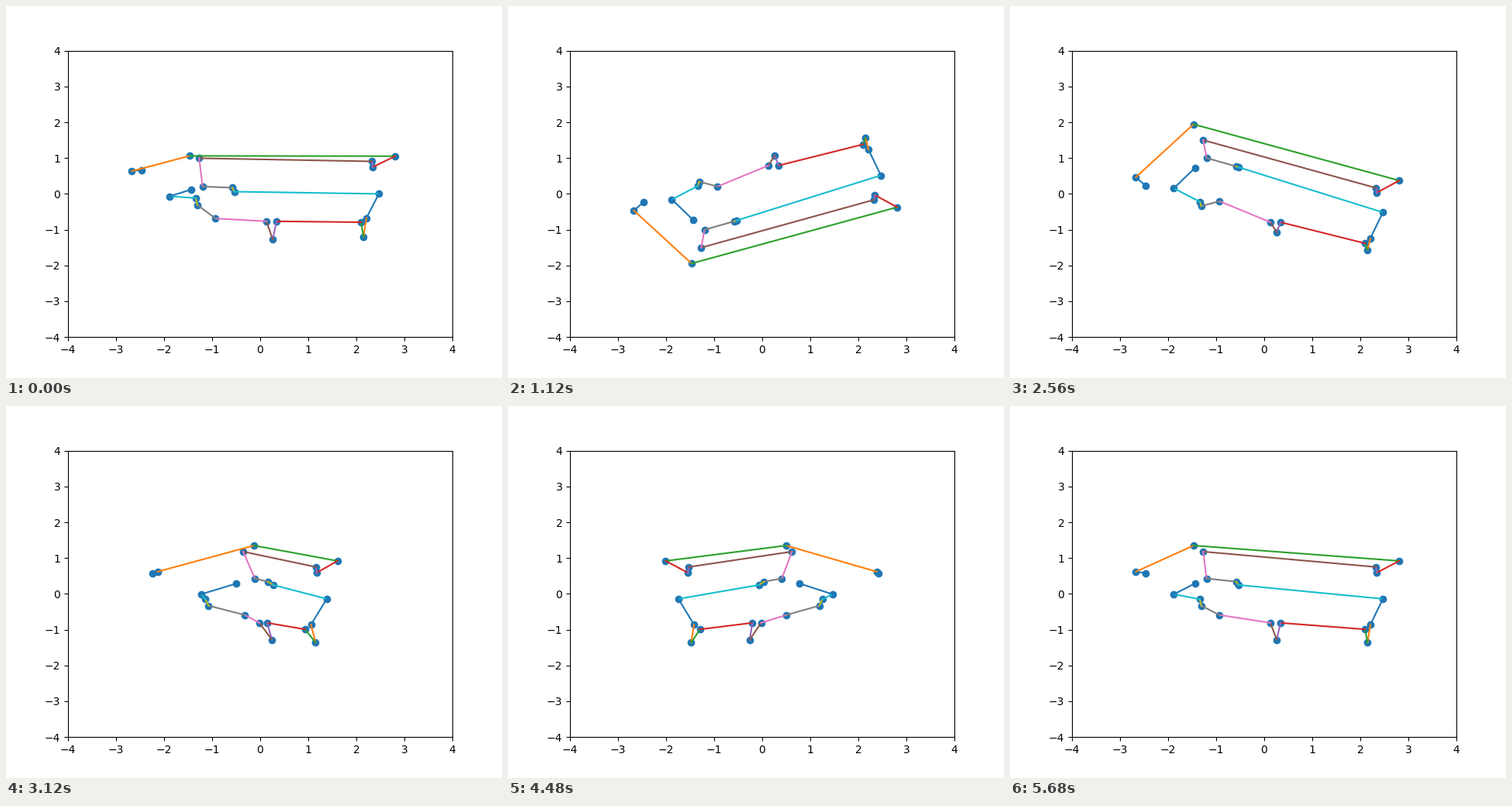
These frames come from a looping animation (640 by 480 pixels, 5840 ms). A matplotlib script:

```python
import numpy as np
import matplotlib.pyplot as plt
from matplotlib.animation import FuncAnimation

TURN = 36  # steps of 10 degrees in one full turn

# Corners of the bent wire, in drawing order
WIRE = np.array([
    (-2.47, .58, -.55), (-2.67, .62, -.14), (-1.47, 1.35, 1.55),
    (2.81, .92, -.85), (2.34, .59, -.96), (2.33, .75, -.97),
    (-1.27, 1.18, .96), (-1.2, .43, 1.26), (-.58, .34, .94),
    (-.54, .25, 1.06), (2.47, -.14, -.79), (2.21, -.86, -.99),
    (2.15, -1.36, -.77), (2.1, -.99, -1.05), (.34, -.81, -.18),
    (.26, -1.28, .07), (.13, -.81, -.18), (-.93, -.59, .61),
    (-1.31, -.33, -.11), (-1.34, -.15, -.18), (-1.88, -.01, .33),
    (-1.44, .29, .95),
])


def project(step):
    """Turn once about the x axis, then once about the y axis."""
    x, y, z = WIRE.T
    angle = 2 * np.pi * (step % TURN + 1) / TURN
    c, s = np.cos(angle), np.sin(angle)
    if step < TURN:
        return np.column_stack((x, y * c - z * s))
    return np.column_stack((x * c + z * s, y))


fig, ax = plt.subplots(figsize=(6.4, 4.8), dpi=100)
ax.set(xlim=(-4, 4), ylim=(-4, 4))

dots = ax.scatter(*project(0).T, color="C0")
edges = [ax.plot([], [])[0] for _ in WIRE[1:]]


def update(frame):
    points = project(min(frame, 2 * TURN - 1))
    dots.set_offsets(points)
    for edge, start, end in zip(edges, points, points[1:]):
        edge.set_data(*zip(start, end))
    return [dots, *edges]


# One extra step holds the last pose
anim = FuncAnimation(fig, update, frames=2 * TURN + 1, interval=80,
                     repeat=True, repeat_delay=0)
plt.show()
```
